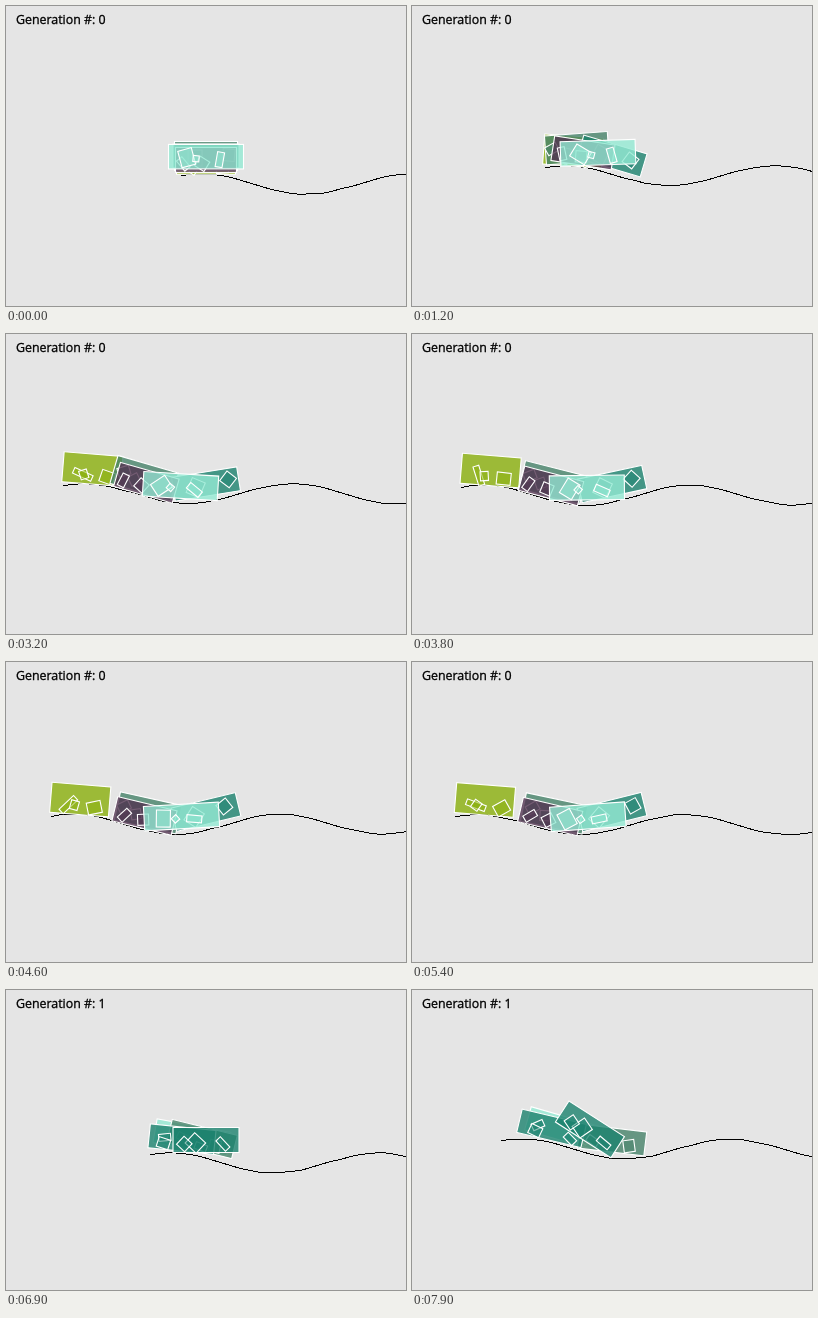
These frames come from a looping animation (400x300 px, 8 s). An HTML page:

```html
<!DOCTYPE html>
<html lang="en">
<head>
<meta charset="utf-8">
<title>Generations</title>
<style>
  html, body { margin: 0; width: 100%; height: 100%; overflow: hidden; background: #e5e5e5; }
  svg { display: block; width: 400px; height: 300px; }
  text { font: 12.4px "Open Sans", "Noto Sans", sans-serif; stroke: #000; stroke-width: .3; }
  rect { stroke: #fff; stroke-width: 1.1; fill-opacity: .8; }
  .load { fill-opacity: .5; }
  #ground { fill: none; stroke: #000; shape-rendering: crispEdges; }
</style>
</head>
<body>
<svg viewBox="0 0 400 300">
  <polyline id="ground"/>
  <g id="cars"></g>
  <text id="label" x="10" y="18"></text>
</svg>
<script>
const LOOP = 8000, RESET = 6000, STEP = 100;
const START = 200, CENTER = 150, CLEARANCE = 17.7, SETTLE = 800;
const OLIVE = '#8aaf0c', GREEN = '#46826a', TEAL = '#1c826f', PURPLE = '#523450', MINT = '#94ead4';
const WAVE = 2 * Math.PI / 208, CREST = 195.5, HEIGHT = 10;
const byId = id => document.getElementById(id);

const groundY = x => 178 - HEIGHT * Math.cos((x - CREST) * WAVE);
const slope = x => Math.atan(HEIGHT * WAVE * Math.sin((x - CREST) * WAVE)) * 180 / Math.PI;

function add(parent, tag, attrs = {}) {
  const node = document.createElementNS('http://www.w3.org/2000/svg', tag);
  for (const k in attrs) node.setAttribute(k, attrs[k]);
  return parent.appendChild(node);
}

const box = (parent, width, height, fill, cls) =>
  add(parent, 'rect', { x: -width / 2, y: -height / 2, width, height, fill, class: cls });

function place(node, x, y, angle) {
  node.setAttribute('transform',
    `translate(${x.toFixed(2)} ${y.toFixed(2)}) rotate(${angle.toFixed(2)})`);
}

// A loose block: size, place in the car, starting angle and spin in degrees per second.
const load = (w, h, x, y, angle, spin) => ({ w, h, x, y, angle, spin });

function car(group, fill, w, h, motion, ...loads) {
  const node = add(group, 'g');
  box(node, w, h, fill, 'body');
  for (const l of loads) l.node = box(node, l.w, l.h, fill, 'load');
  return { node, loads, lift: CLEARANCE, rock: 0, half: 1, swings: 0, ...motion };
}

// Pull away from rest, then come to a stop after `reach` pixels.
const travel = (c, t) => START + c.reach * (1 - Math.exp(-Math.pow(t / c.tau, c.power)));

// Ride along the slope of the ground, rocking for a number of half swings.
function pose(c, t) {
  const x = travel(c, t);
  const tilt = t < c.half * c.swings ? c.rock * Math.sin(Math.PI * t / c.half) : 0;
  const rise = Math.max(0, tilt) * .35;
  return [x, groundY(x) - c.lift - rise, slope(x) * Math.min(1, t / SETTLE) + tilt];
}

const oldGroup = add(byId('cars'), 'g'), newGroup = add(byId('cars'), 'g');

const oldCars = [
  car(oldGroup, OLIVE, 59, 30, { reach: 4.5, tau: 1000, power: 1.8, lift: 14.5 },
    load(20, 6, -10, 6, -236, 80), load(9, 8, -7, 6, -9, 24), load(14, 12, 15.5, 7, 85, -22)),
  car(oldGroup, GREEN, 63, 29, { reach: 74, tau: 2800, power: 2.7, rock: -10, half: 2400, swings: 1 },
    load(12, 9, -23, -1, -20, -4), load(10, 10, -10, 4, 0, 15)),
  car(oldGroup, TEAL, 66, 24, { reach: 132, tau: 2037, power: 1.8 },
    load(12, 12, 21, -1, 5, 13), load(14, 16, -12, 2, 0, 10)),
  car(oldGroup, PURPLE, 61, 25, { reach: 70, tau: 2446, power: 2.2, lift: 13.8 },
    load(13, 7, -21, 4, 50, 16), load(11, 11, -2, 4, 122, -30)),
  car(oldGroup, MINT, 75, 24.5, { reach: 108, tau: 2250, power: 1.9, lift: 17, rock: -16, half: 2400, swings: 1 },
    load(17, 14, -19, 1, 75, -35), load(6, 6, -8, 2, 5, 10), load(7, 15, 13, 3, 10, -20))
];

const newCars = [
  car(newGroup, MINT, 75, 24, { reach: 60, tau: 1900, power: 1.48, lift: 17 },
    load(9, 9, 22, 4, 0, 15)),
  car(newGroup, GREEN, 67, 24, { reach: 130, tau: 1828, power: 2.06 },
    load(11, 12, 16, 4, 10, -13), load(12, 7, -20, 3, 0, 15)),
  car(newGroup, TEAL, 66, 24, { reach: 70, tau: 2845, power: 1.96, lift: 14 },
    load(12, 7, -15.5, 0, 12, -26), load(12, 10, -16, 6, 12, 0), load(12, 7, 21, 6, 0, 17)),
  car(newGroup, TEAL, 66, 25, { reach: 90, tau: 1638, power: 1.44, rock: -18, half: 1300, swings: 2 },
    load(15, 14, -9, 3, -20, 70), load(11, 11, -21, 4, -20, 70), load(14, 6, 17, 4, 83, -40))
];

function drawGround(cx, cy) {
  const points = [];
  for (let x = 175; x - cx < 415; x += 10)
    points.push(`${Math.round(x - cx) + .5},${Math.round(groundY(x) - cy) + .5}`);
  byId('ground').setAttribute('points', points.join(' '));
}

function draw(time) {
  const renewed = time >= RESET;
  const t = renewed ? time - RESET : time;
  const cars = renewed ? newCars : oldCars;
  const front = Math.max(...cars.map(c => travel(c, t)));
  const cx = front - START, cy = groundY(front) - CLEARANCE - CENTER;
  oldGroup.style.display = renewed ? 'none' : '';
  newGroup.style.display = renewed ? '' : 'none';
  byId('label').textContent = 'Generation #: ' + (renewed ? 1 : 0);
  drawGround(cx, cy);
  for (const c of cars) {
    const [x, y, angle] = pose(c, t);
    place(c.node, x - cx, y - cy, angle);
    for (const l of c.loads)
      place(l.node, l.x + 2 * Math.sin(t / 500 + l.x), l.y, l.angle + l.spin * t / 1000);
  }
}

const origin = performance.now();
function tick() {
  const time = (performance.now() - origin) % LOOP;
  draw(Math.floor(time / STEP) * STEP);
  requestAnimationFrame(tick);
}
tick();
</script>
</body>
</html>
```
